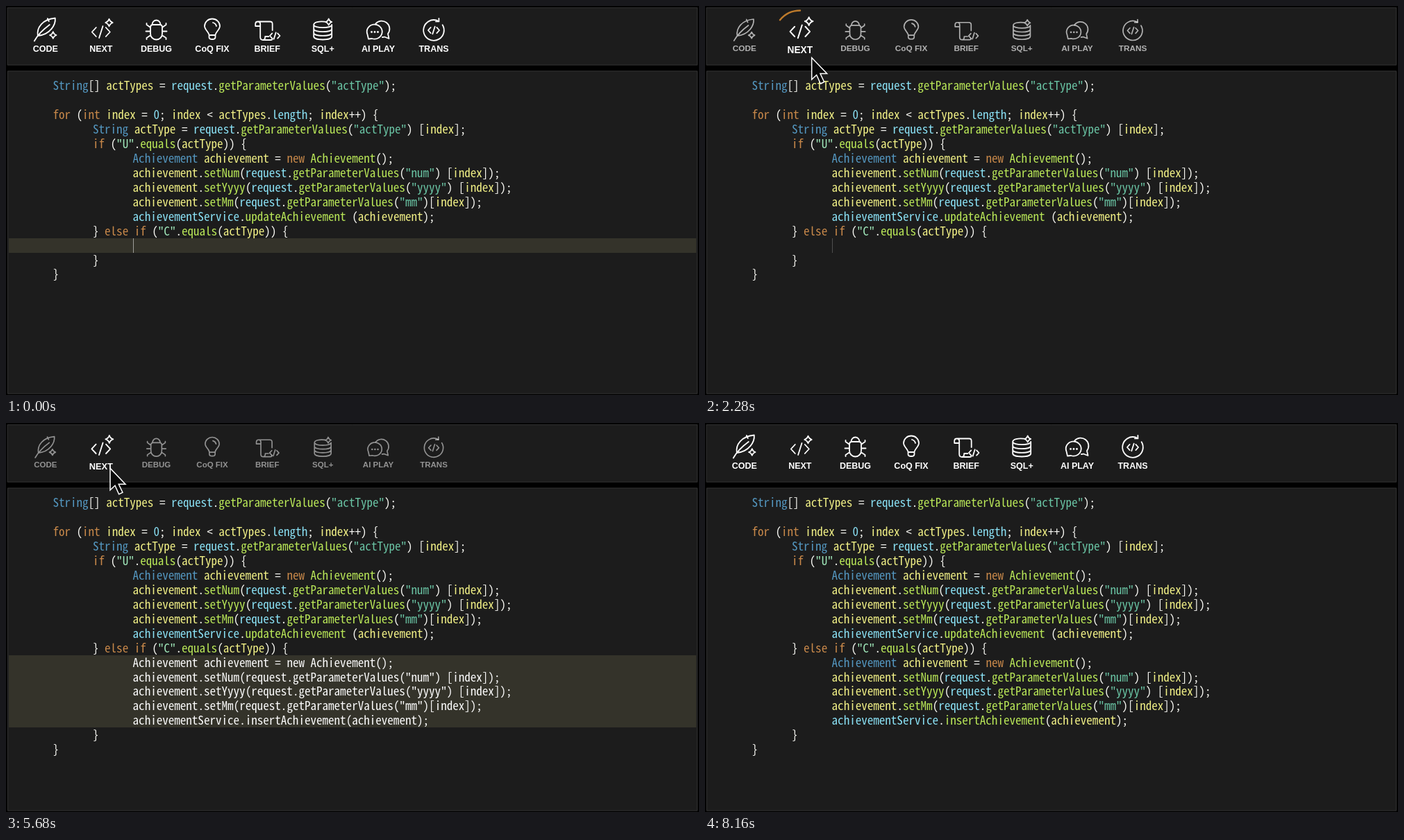
Write an HTML page with a canvas that moves like this. It is 998x561 px and loops after 8.68 s.

```html
<!DOCTYPE html>
<html lang="en">
<head>
<meta charset="utf-8">
<title>Code assistant: next</title>
<style>
html, body { margin: 0; width: 100%; height: 100%; overflow: hidden; background: #000; }
canvas { display: block; width: 100vw; height: 100vh; }
</style>
</head>
<body>
<canvas id="stage" width="998" height="561"></canvas>
<script>
const g = document.getElementById('stage').getContext('2d');
const TAU = Math.PI * 2, LOOP = 8680;
const MONO = '17.06px "Noto Sans Mono CJK KR", "Noto Sans Mono CJK JP", "Noto Sans Mono CJK SC", "Noto Sans Mono", monospace';
const LABEL = 'bold 12.5px "Liberation Sans", Arial, sans-serif';
const ROW = 20.96, TOP = 104.6, CHAR = 8.53;
const ORANGE = '#bd7a2b', BAND = '#34332a';
const COLORS = {
  type: [84, 151, 192], key: [201, 137, 74], name: [241, 240, 134], field: [139, 226, 246],
  call: [186, 232, 88], text: [106, 196, 164], flag: [160, 232, 186], plain: [250, 250, 245]
};
const WHITE = [252, 252, 252], GREY = [128, 128, 128];

// ---- timing helpers
const clamp = x => Math.max(0, Math.min(1, x));
const ramp = (t, a, b) => clamp((t - a) / (b - a));
const ease = x => (1 - Math.cos(Math.PI * x)) / 2;
const fade = (t, a, b) => ease(ramp(t, a, b));
const mix = (a, b, p) => a + (b - a) * p;
function keys(t, list) {
  let v = list[0][1];
  for (let i = 1; i < list.length; i++) v = mix(v, list[i][1], fade(t, list[i - 1][0], list[i][0]));
  return v;
}

// ---- code
const block = (verb, gap) => [
  [2, 'Achievement achievement = new Achievement();'],
  [2, 'achievement.setNum(request.getParameterValues("num") [index]);'],
  [2, 'achievement.setYyyy(request.getParameterValues("yyyy") [index]);'],
  [2, 'achievement.setMm(request.getParameterValues("mm")[index]);'],
  [2, `achievementService.${verb}Achievement${gap}(achievement);`]
];
const head = [
  [0, 'String[] actTypes = request.getParameterValues("actType");'],
  [0, ''],
  [0, 'for (int index = 0; index < actTypes.length; index++) {'],
  [1, 'String actType = request.getParameterValues("actType") [index];'],
  [1, 'if ("U".equals(actType)) {'],
  ...block('update', ' '),
  [1, '} else if ("C".equals(actType)) {']
];
const tail = [[1, '}'], [0, '}']];
const before = [...head, [2, ''], ...tail];
const after = [...head, ...block('insert', ''), ...tail];
const FIRST = 11, LAST = 15;

function kind(word, rest) {
  if (word[0] === '"') return word.length === 3 ? 'flag' : 'text';
  if (/^(for|int|if|else|new)$/.test(word)) return 'key';
  if (/^(request|length|achievementService|\d)$/.test(word)) return 'field';
  if (!/^[A-Za-z]/.test(word)) return 'plain';
  if (/^ ?\(/.test(rest)) return 'call';
  return /^[A-Z]/.test(word) ? 'type' : 'name';
}

function drawLine([indent, code], row, dim, plain) {
  for (const m of code.matchAll(/"[^"]*"|[A-Za-z]+|\d|[^\s\w"]+/g)) {
    const k = kind(m[0], code.slice(m.index + m[0].length));
    let c = COLORS[k];
    if (k === 'type' || k === 'key') c = c.map((v, i) => mix(v, GREY[i], dim));
    c = c.map((v, i) => Math.round(mix(v, WHITE[i], plain)));
    g.fillStyle = `rgb(${c})`;
    g.fillText(m[0], 67.4 + indent * 57.6 + m.index * CHAR, TOP + row * ROW + 16.4);
  }
}

// ---- toolbar icons, drawn around (0, 0)
const path = d => g.stroke(new Path2D(d));
const ring = (x, y, r, a = 0, b = TAU) => { g.beginPath(); g.arc(x, y, r, a, b); g.stroke(); };
function spark(x, y, r) {
  const k = r * 0.24;
  path(`M${x} ${y - r}Q${x + k} ${y - k} ${x + r} ${y}Q${x + k} ${y + k} ${x} ${y + r}` +
    `Q${x - k} ${y + k} ${x - r} ${y}Q${x - k} ${y - k} ${x} ${y - r}Z`);
}
function tag(x, y, s) {
  path(`M${x - 7 * s} ${y - 6.5 * s}l${-6 * s} ${6.5 * s}l${6 * s} ${6.5 * s}` +
    `M${x + 7 * s} ${y - 6.5 * s}l${6 * s} ${6.5 * s}l${-6 * s} ${6.5 * s}` +
    `M${x + 2.7 * s} ${y - 8.5 * s}l${-5.4 * s} ${17 * s}`);
}
const items = [
  [56.8, 'CODE', () => {
    path('M-16 15.5Q-9 3 6-8M-11 8C-13-4-4-16 14-17.5C15-8 7 6-11 8M3-17L5-13');
    spark(11, 7, 4.8);
  }],
  [136.8, 'NEXT', () => { tag(0, 2.5, 1); spark(11.7, -11, 5.3); }],
  [216.5, 'DEBUG', () => {
    path('M-8.5-4Q-8.5-8-5-8H5Q8.5-8 8.5-4V5A8.5 8.5 0 0 1-8.5 5ZM-6-8A6 6.5 0 0 1 6-8' +
      'M-15 1.5H-8.5M15 1.5H8.5M-14-10V-8L-8.5-4M14-10V-8L8.5-4M-14 13V11L-8 7M14 13V11L8 7');
  }],
  [297, 'CoQ FIX', () => {
    path('M-4.5 7C-4.5 3-11-1-11-6A11 10.5 0 0 1 11-6C11-1 4.5 3 4.5 7ZM-4.5 7V10Q-4.5 13 0 13Q4.5 13 4.5 10V7M1-11Q5-10 6-6');
  }],
  [376.2, 'BRIEF', () => {
    path('M-10-6H-17V-9Q-17-12.5-13.5-12.5H4Q7.5-12.5 7.5-9V0M-13.5-12.5Q-10-12.5-10-9V10Q-10 14-6 14H5Q7.5 14 7.5 12' +
      'M-6 14Q-3 14-3 9H2');
    tag(11, 8, 0.56);
  }],
  [456.2, 'SQL+', () => {
    path('M3-12.3C-5-13.5-13-11.5-13-8C-13-2.5 13-2.5 13-8M-13-8V9C-13 15 13 15 13 9V-8' +
      'M-13-2C-13 3.5 13 3.5 13-2M-13 3.7C-13 9.2 13 9.2 13 3.7');
    spark(8.5, -12, 4.6);
  }],
  [536, 'AI PLAY', () => {
    path('M-14 12.5L-15.5 6A11 10.5 0 1 1-9 12Z');
    path('M-4-9A10.5 10.5 0 1 1 14 5L15.5 12L9 9.5Q7.5 10 6 10');
    for (const x of [-9.5, -5, -0.5]) { g.beginPath(); g.arc(x, 2.5, 1.4, 0, TAU); g.fill(); }
  }],
  [616, 'TRANS', () => {
    ring(0, 0, 14.8, -0.55, TAU - 1.05);
    path('M7.4-17V-12.6H3');
    tag(0, 0, 0.62);
  }]
];

function drawItem([x, label, icon], scale, alpha) {
  g.save();
  g.globalAlpha = alpha;
  g.translate(x, 44);
  g.scale(scale, scale);
  g.fillStyle = g.strokeStyle = '#fff';
  g.font = LABEL;
  g.textAlign = 'center';
  g.fillText(label, 0, 22);
  g.translate(0, -9);
  g.lineWidth = 1.8;
  icon();
  g.restore();
}

// ---- scene parts
function panel(y, h) {
  g.fillStyle = '#1c1c1c';
  g.fillRect(2, y, 994, h);
  g.strokeStyle = '#303030';
  g.lineWidth = 1;
  g.strokeRect(2.5, y + 0.5, 993, h - 1);
}

function band(row, count = 1) {
  const y = Math.round(TOP + row * ROW);
  g.fillStyle = BAND;
  g.fillRect(4, y, 990, Math.floor(TOP + (row + count) * ROW) - y);
}

function drawToolbar(t) {
  const guide = fade(t, 40, 500) - fade(t, 1860, 2180);
  const hover = fade(t, 2120, 2370) - ramp(t, 6560, 6900);
  const next = keys(t, [[2120, 1], [2300, 1.1], [2680, 1.1], [2860, 0.97], [3120, 1.03], [6560, 1.03], [6880, 1]]);
  panel(2, 83.5);
  items.forEach((item, i) => {
    if (i === 1) drawItem(item, next, 1);
    else drawItem(item, 1 - 0.08 * hover, (1 - 0.86 * guide) * (1 - 0.48 * hover));
  });

  const from = ramp(t, 1880, 2345), to = fade(t, 320, 900);
  if (to > from) {
    const pulse = 1 + 0.13 * Math.sin(Math.PI * ramp(t, 450, 1150));
    g.strokeStyle = ORANGE;
    g.lineWidth = 2.4;
    ring(137, 44.3, 37.8 * pulse, from * TAU - TAU / 4, to * TAU - TAU / 4);
  }
}

function drawCallout(t) {
  const shown = fade(t, 800, 1120) - fade(t, 1820, 2100);
  if (shown <= 0) return;
  g.save();
  g.globalAlpha = shown;
  g.translate((1 - shown) * 24, 0);
  const arrow = new Path2D('M181.5 45L206 20V31H351.5V59H206V70Z');
  g.fillStyle = 'rgba(54,51,42,.93)';
  g.fill(arrow);
  g.lineJoin = 'miter';
  g.lineWidth = 2.4;
  g.strokeStyle = ORANGE;
  g.stroke(arrow);
  g.fillStyle = '#fff';
  g.font = MONO;
  g.fillText('Next Icon Click', 209, 51);
  g.restore();
}

function pointer(t) {
  const up = fade(t, 1192, 2457), back = fade(t, 5640, 6640);
  const x = mix(207, 151, up) - 4 * fade(t, 2680, 2900) + 2 * fade(t, 4200, 4400);
  const y = mix(326, 62, up) + 2 * fade(t, 4200, 4400);
  return { x: mix(x, 397, back), y: mix(y, 376.5, back), alpha: ramp(t, 1000, 1200) - ramp(t, 7960, 8160) };
}

function drawPointer({ x, y, alpha }) {
  if (alpha <= 0) return;
  g.save();
  g.globalAlpha = alpha;
  g.translate(x, y);
  const shape = new Path2D('M0 0V31.5L7 25L12.7 37.5L18 35L12.3 23H22Z');
  g.fillStyle = '#0a0a0a';
  g.fill(shape);
  g.lineJoin = 'miter';
  g.lineWidth = 1.5;
  g.strokeStyle = '#fff';
  g.stroke(shape);
  g.restore();
}

function drawEditor(t, mouse) {
  const dim = fade(t, 3540, 3800) - fade(t, 4600, 4920);
  const done = t >= 4600;
  const plain = 1 - fade(t, 7000, 7520);
  panel(93.5, 466);

  const row = t < 1192 ? FIRST : Math.floor((mouse.y - TOP) / ROW);
  if (row >= 0 && row <= FIRST && !(done && row === FIRST)) band(row);
  if (done) {
    g.globalAlpha = plain;
    band(FIRST, 5);
    g.globalAlpha = 1;
  }
  g.font = MONO;
  (done ? after : before).forEach((line, i) =>
    drawLine(line, i, dim, done && i >= FIRST && i <= LAST ? plain : 0));

  if (!done) {
    g.globalAlpha = (0.6 + 0.4 * Math.cos((t - 1720) / 1000 * TAU)) * (1 - dim);
    g.fillStyle = '#fff';
    g.fillRect(183, 335, 1, 21);
    g.globalAlpha = 1;
  }
  if (dim > 0) {
    g.fillStyle = `rgba(0,0,0,${0.52 * dim})`;
    g.fillRect(2, 93, 994, 467);
    g.globalAlpha = dim;
    g.strokeStyle = '#6a6a6a';
    g.lineWidth = 2;
    ring(499.5, 280, 26);
    const a = (t - 4200) / 1000 * TAU - 0.35;
    g.strokeStyle = '#c8802a';
    g.lineWidth = 4;
    ring(499.5, 280, 25, a, a + 2.3);
    g.globalAlpha = 1;
  }
}

function draw(now) {
  const t = Math.floor(now % LOOP / 40) * 40;
  const mouse = pointer(t);
  g.fillStyle = '#000';
  g.fillRect(0, 0, 998, 561);
  g.lineJoin = g.lineCap = 'round';
  drawToolbar(t);
  g.lineCap = 'butt';
  drawEditor(t, mouse);
  drawCallout(t);
  drawPointer(mouse);
}

const start = performance.now();
function tick() {
  draw(performance.now() - start);
  requestAnimationFrame(tick);
}
tick();
</script>
</body>
</html>
```
